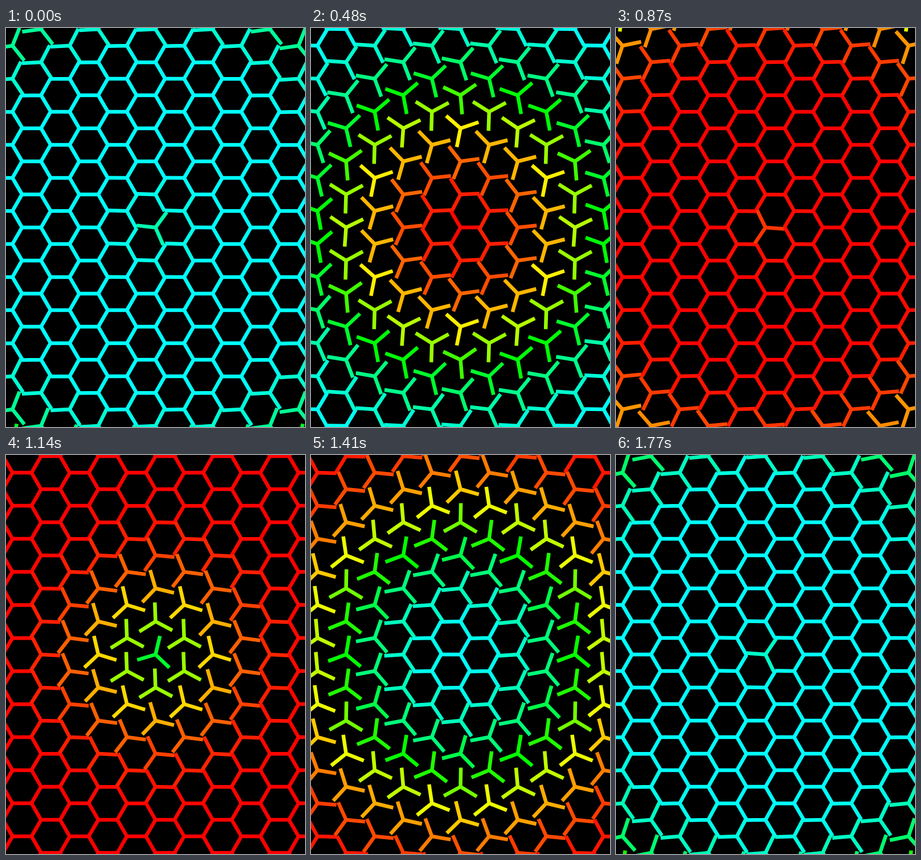
Animation, 525 px wide and 700 px high, one loop 1800 ms. Source, as an HTML page with a canvas:

```html
<!DOCTYPE html>
<html lang="en">
<head>
<meta charset="utf-8">
<title>Turning honeycomb</title>
<style>
  html, body { margin: 0; width: 100%; height: 100%; overflow: hidden; background: #000; }
  canvas { display: block; }
</style>
</head>
<body>
<canvas id="stage" width="525" height="700"></canvas>
<script>
const ctx = document.getElementById('stage').getContext('2d');
const W = 525, H = 700;
const LOOP = 1800, STEP = 30;
const GAP = 58, ARM = GAP / Math.sqrt(3), COLUMN = ARM * 1.5;
const SPEED = 0.683;  // px the wave travels per ms
const LEAD = 285;     // ms the centre is ahead
const TURN = 60;      // degrees per half loop

// Sine wave sharpened by a quadratic ease in and out
function ease(p) {
  const s = 0.5 - 0.5 * Math.cos(Math.PI * p);
  return s < 0.5 ? 2 * s * s : 1 - 2 * (1 - s) ** 2;
}

function tripod(x, y, time) {
  const delay = Math.hypot(x, y) / SPEED;
  const phase = (time + LEAD - delay + LOOP) / (LOOP / 2);
  const half = Math.floor(phase);
  const angle = TURN * (half + ease(phase - half));
  const hue = Math.abs(180 - 3 * (angle % 120));
  ctx.strokeStyle = `hsl(${hue}, 100%, 50%)`;
  ctx.beginPath();
  for (let i = 0; i < 3; i++) {
    const a = (angle + 60 + 120 * i) * Math.PI / 180;
    ctx.moveTo(x, y);
    ctx.lineTo(x + ARM * Math.cos(a), y + ARM * Math.sin(a));
  }
  ctx.stroke();
}

function draw(now) {
  const time = Math.floor((now % LOOP) / STEP) * STEP;
  ctx.setTransform(1, 0, 0, 1, 0, 0);
  ctx.fillStyle = '#000';
  ctx.fillRect(0, 0, W, H);
  ctx.translate(W / 2, H / 2);
  ctx.lineWidth = 6.5;
  for (let c = -6; c <= 6; c++)
    for (let r = -7; r <= 7; r++)
      tripod(c * COLUMN, (r + (c & 1) / 2) * GAP, time);
}

const start = performance.now();
function tick() {
  draw(performance.now() - start);
  requestAnimationFrame(tick);
}
tick();
</script>
</body>
</html>
```
